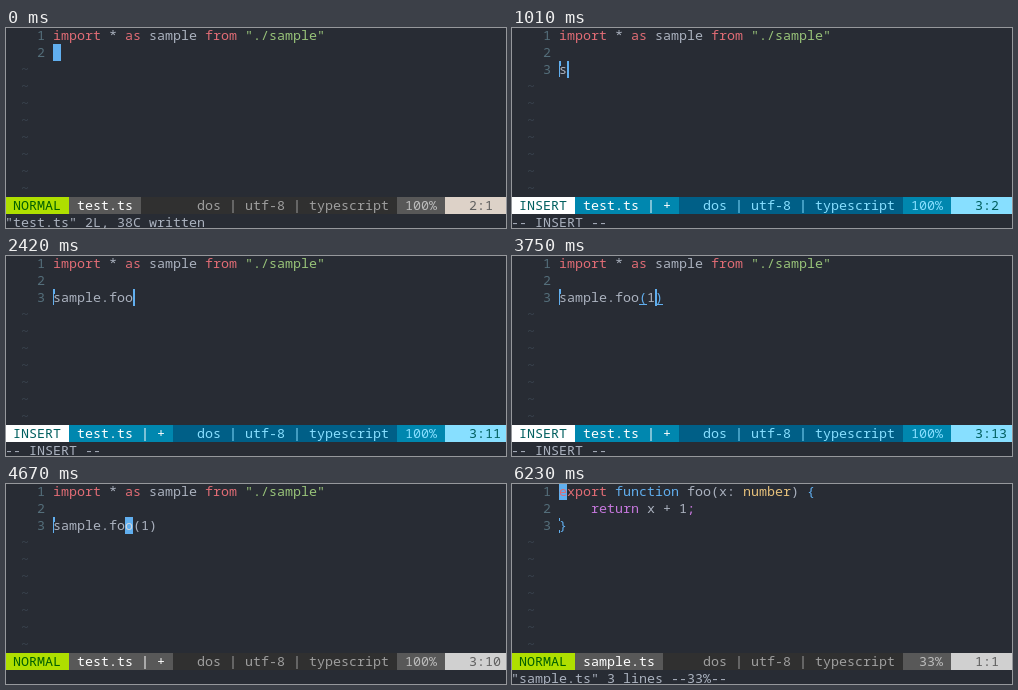
Recreate the animation shown at these times as an HTML page. Size 500 by 200 pixels, loop 6530 ms.

```html
<!DOCTYPE html>
<html lang="en">
<head>
<meta charset="utf-8">
<title>Go to definition</title>
<style>
html, body { margin: 0; width: 100%; height: 100%; overflow: hidden; background: #282c34; }
svg { display: block; width: 500px; height: 200px; }
text { font: 13.3333px "Noto Sans Mono", "DejaVu Sans Mono", monospace; white-space: pre; }
</style>
</head>
<body>
<svg id="stage" viewBox="0 0 500 200"></svg>
<script>
(() => {
const LOOP = 6530, CW = 8, RH = 17, CODE = 6, STATUS = 10;
const ink = {
  fg: '#abb2bf', red: '#e06c75', blue: '#61afef', green: '#98c379', gold: '#e5c07b',
  purple: '#c678dd', number: '#546e7a', tilde: '#3b4550', light: '#d0d6de', dark: '#282c34'
};

// Status line colours: [background, text] for each segment
const themes = {
  normal: { label: 'NORMAL', mode: ['#afdf00', '#005f00'], file: ['#585858', '#ffffff'],
    middle: ['#303030', '#9e9e9e'], percent: ['#585858', '#bcbcbc'], place: ['#d0d0d0', '#606060'] },
  insert: { label: 'INSERT', mode: ['#ffffff', '#005f5f'], file: ['#0087af', '#ffffff'],
    middle: ['#005f87', '#87dfff'], percent: ['#0087af', '#87dfff'], place: ['#87dfff', '#005f5f'] }
};
themes.saved = { ...themes.normal, place: ['#ddd2c8', '#606060'] };

const importLine = [['import', 'red'], [' * '], ['as', 'red'], [' sample '], ['from', 'red'], [' '], ['"./sample"', 'green']];
const sampleFile = [
  [[' '], ['xport', 'red'], [' '], ['function', 'blue'], [' foo(x: '], ['number', 'gold'], [') '], ['{', 'blue']],
  [['    '], ['return', 'purple'], [' x + 1'], [';', 'purple']],
  [['}', 'blue']]
];

const cellX = col => col * CW - 1;
const cellY = row => row * RH - 1;
const rect = (x, y, w, h, fill) => `<rect x="${x}" y="${y}" width="${w}" height="${h}" fill="${fill}"/>`;
const text = (col, row, s, fill) =>
  `<text x="${cellX(col)}" y="${cellY(row) + 13}" fill="${fill}">${s}</text>`;

function codeLine(row, runs) {
  let col = CODE, out = text(4, row, row + 1, ink.number);
  for (const [s, color = 'fg'] of runs) {
    const lead = s.length - s.trimStart().length;
    if (s.trim()) out += text(col + lead, row, s.trim(), ink[color]);
    col += s.length;
  }
  return out;
}

function paren(col, s) {
  return text(CODE + col, 2, s, ink.blue) + rect(cellX(CODE + col), 48, CW, 1, ink.blue);
}

function block(row, col, char, fill = ink.light) {
  return rect(cellX(CODE + col), cellY(row), CW, RH, ink.blue) + text(CODE + col, row, char, fill);
}

const bar = col => rect(cellX(CODE + col), cellY(2), 2, RH, ink.blue);

function statusLine({ theme, file, percent = '100%', place }) {
  const t = themes[theme], y = cellY(STATUS);
  const fileEnd = 10 + file.length;
  const segment = (from, to, [bg, fg], col, s) =>
    rect(cellX(from), y, (to - from) * CW, RH, bg) + text(col, STATUS, s, fg);
  return segment(0, 8, t.mode, 1, t.label) +
    segment(8, fileEnd, t.file, 9, file) +
    segment(fileEnd, 49, t.middle, 24, 'dos | utf-8 | typescript') +
    segment(49, 55, t.percent, 54 - percent.length, percent) +
    segment(55, 63, t.place, 58, place);
}

function screen(body, lines, message, status) {
  let out = rect(0, 0, 500, 200, ink.dark) + body;
  for (let row = lines; row < STATUS; row++) out += text(2, row, '~', ink.tilde);
  return out + statusLine(status) + text(0, 11, message, ink.fg);
}

function savedScreen() {
  return screen(codeLine(0, importLine) + codeLine(1, []) + block(1, 0, ''), 2,
    '"test.ts" 2L, 38C written', { theme: 'saved', file: 'test.ts', place: '2:1' });
}

// Leftover of the first insert cursor at the start of line 3
const trail = rect(47, 33, 2, 5, ink.blue) + rect(47, 38, 1, 11, ink.blue);

function editScreen(line, col, theme, matched) {
  const insert = theme === 'insert';
  let body = codeLine(0, importLine) + codeLine(1, []);
  if (matched) {
    const close = line.length - 1;
    body += codeLine(2, [[line.slice(0, 10)], [' '], [line.slice(11, close)]]) +
      paren(10, '(') + paren(close, ')');
  } else {
    body += codeLine(2, [[line]]);
  }
  if (line) body += trail;
  body += insert ? bar(col) : block(2, col, line[col]);
  return screen(body, 3, insert ? '-- INSERT --' : '',
    { theme, file: 'test.ts | +', place: '3:' + (col + 1) });
}

function sampleScreen(t) {
  const cursorInk = t < 5770 ? ink.light : t < 6230 ? ink.dark : ink.red;
  const body = sampleFile.map((runs, row) => codeLine(row, runs)).join('') +
    rect(47, 34, 1, 3, ink.blue) + rect(47, 46, 1, 3, ink.blue) + block(0, 0, 'e', cursorInk);
  return screen(body, 3, '"sample.ts" 3 lines --33%--',
    { theme: 'normal', file: 'sample.ts', percent: '33%', place: '1:1' });
}

const typed = 'sample.foo(1';
const keyTimes = [1010, 1080, 1160, 1310, 1480, 1630, 1800, 2180, 2330, 2420, 3580, 3750];

function draw(t) {
  if (t < 230) return savedScreen();
  if (t < 4130) {
    const count = keyTimes.filter(k => k <= t).length;
    const open = count > 10;
    return editScreen(typed.slice(0, count) + (open ? ')' : ''), count, 'insert', open);
  }
  if (t < 5530) {
    const col = t < 4590 ? 11 : t < 4670 ? 10 : 9;
    return editScreen(typed + ')', col, 'normal', col === 10);
  }
  return sampleScreen(t);
}

const stage = document.getElementById('stage');
const start = performance.now();
let shown = '';

function tick() {
  const picture = draw((performance.now() - start) % LOOP);
  if (picture !== shown) stage.innerHTML = shown = picture;
  requestAnimationFrame(tick);
}
tick();
})();
</script>
</body>
</html>
```
